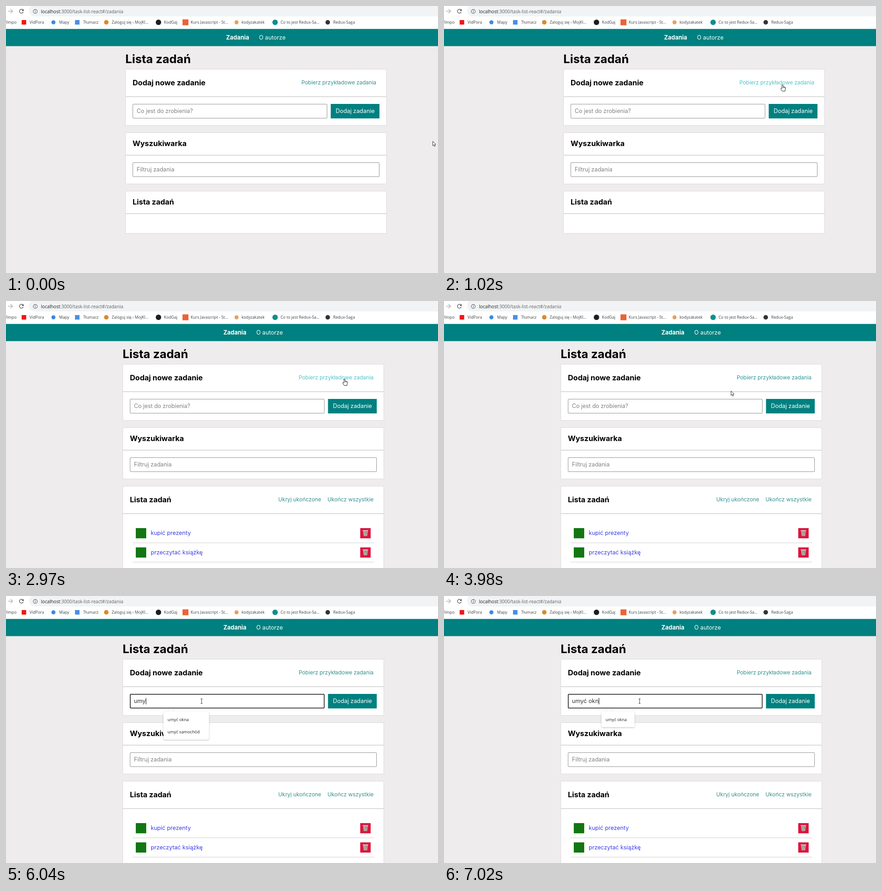
These frames come from a looping animation (952 px wide and 589 px high, 8000 ms). An HTML page with a canvas:

```html
<!DOCTYPE html>
<html lang="pl">
<head>
<meta charset="utf-8">
<title>Lista zadań</title>
<style>
html, body { margin: 0; width: 100%; height: 100%; overflow: hidden; background: #eeecec; }
canvas { display: block; }
</style>
</head>
<body>
<canvas id="stage" width="952" height="589"></canvas>
<script>
const ctx = document.getElementById('stage').getContext('2d');
const LOOP = 8000;
const TEAL = '#008080';
const LINK = '#358f8f';
const BORDER = '#929292';
const PLACEHOLDER = '#818181';
const PAGE_FONT = 'Inter, sans-serif';
const UI_FONT = '"Open Sans", sans-serif';

// Each state holds until the next one starts.
const states = [
  { at: 0, cursor: ['arrow', 940, 298] },
  { at: 1020, cursor: ['hand', 746, 173], linkColor: '#4cc4cd' },
  { at: 2010, cursor: ['blocked', 741.5, 169.5], loading: true },
  { at: 2970, cursor: ['hand', 746, 171.5], linkColor: '#4cc4cd', tasks: true },
  { at: 3980, cursor: ['arrow', 632, 198], linkColor: '#2f9799', tasks: true },
  { at: 5050, cursor: ['beam', 432.5, 232], tasks: true, border: '#5c5c5c' },
  { at: 6040, cursor: ['beam', 431, 232], tasks: true, typed: 'umy',
    hints: ['umyć okna', 'umyć samochód'], hintWidth: 100.5 },
  { at: 7020, cursor: ['beam', 431, 232], tasks: true, typed: 'umyć okn',
    hints: ['umyć okna'], hintWidth: 73 }
];

const bookmarks = [
  ['Wimpo', -6],
  ['VidPora', 52, 'square', '#f01616', 39.5, 5],
  ['Mapy', 117, 'circle', '#3c8ae0', 104.5, 4.5],
  ['Tłumacz', 170, 'square', '#4a8fe7', 157, 5],
  ['Zaloguj się ‹ MojKl...', 233, 'circle', '#d98a2b', 221, 5],
  ['KodGaj', 348, 'circle', '#1b1f23', 336, 6],
  ['Kurs Javascript - St...', 407, 'square', '#ee6135', 395.5, 6.5],
  ['kodyzakatek', 519, 'circle', '#e9a05c', 508, 4.5],
  ['Co to jest Redux-Sa...', 605, 'circle', '#0d8f8c', 593, 6],
  ['Redux-Saga', 721, 'circle', '#333', 709, 5]
];

function text(str, x, y, size, color, { weight = 400, font = PAGE_FONT, align = 'left' } = {}) {
  ctx.font = `${weight} ${size}px ${font}`;
  ctx.fillStyle = color;
  ctx.textAlign = align;
  ctx.fillText(str, x, y);
  return ctx.measureText(str).width;
}

function rect(x, y, w, h, color) {
  ctx.fillStyle = color;
  ctx.fillRect(x, y, w, h);
}

function circle(x, y, r, fill, stroke, width = 1) {
  ctx.beginPath();
  ctx.arc(x, y, r, 0, Math.PI * 2);
  paint(fill, stroke, width);
}

function poly(points, fill, stroke, width = 1, close = true) {
  ctx.beginPath();
  points.forEach(([x, y]) => ctx.lineTo(x, y));
  if (close) ctx.closePath();
  paint(fill, stroke, width);
}

function paint(fill, stroke, width) {
  if (fill) { ctx.fillStyle = fill; ctx.fill(); }
  if (stroke) { ctx.strokeStyle = stroke; ctx.lineWidth = width; ctx.stroke(); }
}

const line = (points, color, width = 1) => poly(points, null, color, width, false);

function roundBox(x, y, w, h, r, fill, stroke, width = 1) {
  ctx.beginPath();
  ctx.roundRect(x + width / 2, y + width / 2, w - width, h - width, r);
  paint(fill, stroke, width);
}

function drawBrowser() {
  rect(0, 0, 952, 51, '#fff');
  ctx.beginPath();
  ctx.roundRect(51, -2, 960, 25, 12);
  paint('#f1f3f4');

  line([[4, 11.5], [14, 11.5]], '#a5a8ab', 1.2);
  line([[10, 7], [14.5, 11.5], [10, 16]], '#a5a8ab', 1.2);

  ctx.beginPath();
  ctx.arc(34, 11.5, 4.3, 0.35, Math.PI * 1.78);
  paint(null, '#55585c', 1.4);
  poly([[39, 6.5], [39, 11], [34.5, 11]], '#55585c');

  circle(64.5, 12, 4.4, null, '#5f6368', 1.1);
  rect(64, 11.3, 1.1, 3.2, '#5f6368');
  rect(64, 9.3, 1.1, 1.1, '#5f6368');

  const hostWidth = text('localhost', 77, 15.7, 10.1, '#202124', { font: UI_FONT });
  text(':3000/task-list-react#/zadania', 77 + hostWidth, 15.7, 10.1, '#5f6368', { font: UI_FONT });

  for (const [label, x, shape, color, cx, r] of bookmarks) {
    text(label, x, 39.3, 8.8, '#3c4043', { font: UI_FONT });
    if (shape === 'circle') circle(cx, 36, r, color);
    if (shape === 'square') rect(cx - r, 36 - r, r * 2, r * 2, color);
  }
}

function card(y, divider, bottom, title) {
  roundBox(263, y, 576, bottom - y, 0, '#fff', '#dcdcdc');
  rect(263, divider, 576, 2, '#dadada');
  text(title, 279, (y + divider) / 2 + 5.7, 16.4, '#000', { weight: 700 });
}

function drawTrash(x, y) {
  rect(x, y, 23, 22.5, '#dc143c');
  poly([[x + 6, y + 5], [x + 17, y + 5], [x + 15.3, y + 17.5], [x + 7.7, y + 17.5]], '#b9a9a4');
  rect(x + 5.5, y + 4.5, 12, 1.6, '#d2cdca');
  for (let i = 0; i < 3; i++) {
    rect(x + 8 + i * 2.7, y + 7, 1.2, 9, '#8d6565');
    rect(x + 7, y + 8 + i * 3, 9, 0.9, '#d2cdca');
  }
}

function drawTask(label, y) {
  rect(292, y, 23, 22.5, '#127612');
  text(label, 325, y + 15.2, 12.6, '#3c3ce8');
  drawTrash(786.6, y);
  rect(285, y + 32, 532, 1, '#cfcfcf');
}

function drawPage(state) {
  rect(0, 51, 952, 538, '#eeecec');
  rect(0, 50.6, 952, 37.9, TEAL);

  ctx.save();
  // The page scrollbar narrows the centred layout.
  if (state.tasks) ctx.translate(-6, 0);

  text('Zadania', 485, 74, 12.9, '#fff', { weight: 700 });
  text('O autorze', 557.5, 74, 12.7, '#fff');
  text('Lista zadań', 263, 126, 25.9, '#000', { weight: 700 });

  card(139, 199, 264, 'Dodaj nowe zadanie');
  const [link, color] = state.loading
    ? ['Ładowanie...', '#d2d2d2']
    : ['Pobierz przykładowe zadania', state.linkColor || LINK];
  text(link, 816, 173, 11.9, color, { align: 'right' });

  const focused = Boolean(state.typed);
  roundBox(279, 216, 429, 32, 1.5, '#fff',
    focused ? '#101010' : state.border || BORDER, focused ? 1.5 : 1);
  if (focused) {
    const width = text(state.typed, 288, 236, 12.8, '#333');
    rect(Math.round(288 + width), 225, 1, 14, '#000');
  } else {
    text('Co jest do zrobienia?', 288, 236, 12.5, PLACEHOLDER);
  }
  rect(715.6, 216, 107.4, 32, TEAL);
  text('Dodaj zadanie', 769.5, 236, 12.8, '#fff', { align: 'center' });

  card(279, 328, 393, 'Wyszukiwarka');
  roundBox(279, 345, 544, 32, 1.5, '#fff', BORDER);
  text('Filtruj zadania', 288, 365, 12.6, PLACEHOLDER);

  if (state.tasks) {
    card(408, 468, 620, 'Lista zadań');
    text('Ukryj ukończone', 700.5, 442.3, 11.9, LINK, { align: 'right' });
    text('Ukończ wszystkie', 816, 442.3, 11.9, LINK, { align: 'right' });
    drawTask('kupić prezenty', 501);
    drawTask('przeczytać książkę', 543.5);
  } else {
    card(408, 457, 502, 'Lista zadań');
  }
  ctx.restore();
}

function drawHints({ hints, hintWidth }) {
  const height = 7 + hints.length * 27.5;
  ctx.save();
  ctx.shadowColor = 'rgba(0,0,0,.28)';
  ctx.shadowBlur = 3;
  ctx.shadowOffsetY = 1;
  ctx.beginPath();
  ctx.roundRect(347, 255, hintWidth, height, 3);
  paint('#fff');
  ctx.restore();
  poly([[357, 255.5], [363.5, 249.5], [370, 255.5]], '#fff');
  line([[357.5, 255], [363.5, 249.5], [369.5, 255]], '#e2e2e2', 0.8);
  hints.forEach((hint, i) => text(hint, 356, 275.5 + i * 27.5, 9.25, '#222', { font: UI_FONT }));
}

const cursors = {
  arrow() {
    poly([[0.5, 0.5], [0.5, 10.2], [2.8, 8.1], [4.4, 11.8], [6, 11.1], [4.5, 7.5], [7.2, 7.2]],
      '#fff', '#222', 0.9);
  },
  hand() {
    ctx.beginPath();
    ctx.moveTo(-1.2, 9);
    ctx.lineTo(-1.2, 1.2);
    ctx.quadraticCurveTo(0, -0.6, 1.2, 1.2);
    ctx.lineTo(1.2, 5.2);
    ctx.lineTo(5.4, 6);
    ctx.quadraticCurveTo(6.8, 6.4, 6.6, 8);
    ctx.lineTo(5.2, 15);
    ctx.lineTo(-0.6, 15);
    ctx.lineTo(-4, 9.6);
    ctx.quadraticCurveTo(-3.4, 7.4, -1.2, 9);
    ctx.closePath();
    paint('#fff', '#222', 1);
    line([[1.2, 5.2], [1.2, 8]], '#222', 0.7);
    line([[3.2, 5.8], [3.2, 8]], '#222', 0.7);
    line([[5, 6.2], [5, 8.2]], '#222', 0.7);
  },
  blocked() {
    circle(0, 0, 4.2, '#fff', '#c3121f', 1.7);
    line([[-3, -3], [3, 3]], '#c3121f', 1.7);
  },
  beam() {
    line([[-2, -5], [2, -5]], '#333');
    line([[0, -5], [0, 5]], '#333');
    line([[-2, 5], [2, 5]], '#333');
  }
};

function drawCursor([kind, x, y]) {
  ctx.save();
  ctx.translate(x, y);
  cursors[kind]();
  ctx.restore();
}

const start = performance.now();

function frame() {
  const time = (performance.now() - start) % LOOP;
  const state = states.findLast(({ at }) => at <= time);
  drawBrowser();
  drawPage(state);
  if (state.hints) drawHints(state);
  drawCursor(state.cursor);
  requestAnimationFrame(frame);
}

frame();
</script>
</body>
</html>
```
